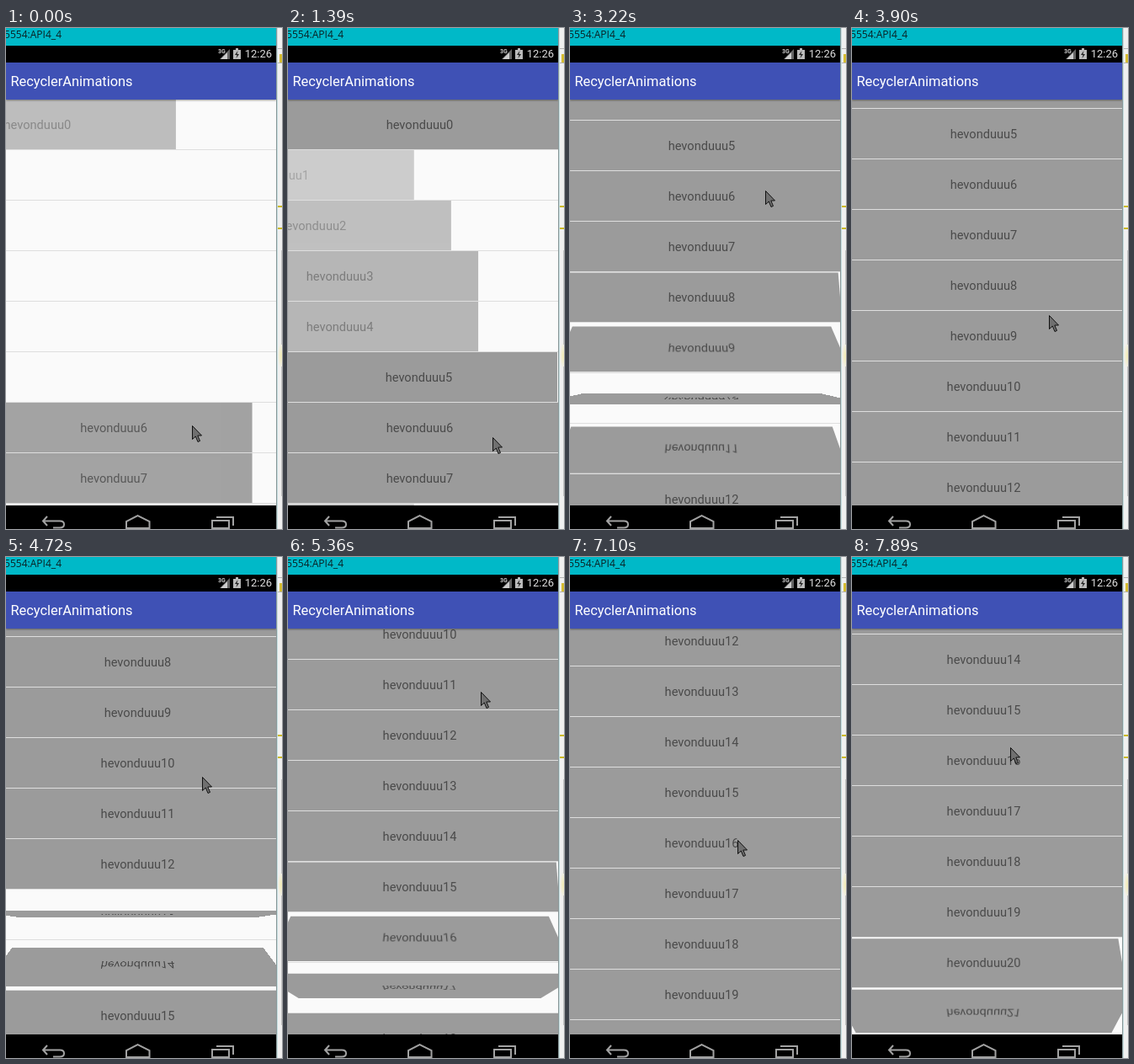
Write an HTML page that moves like this. It is 328 by 595 pixels and loops after 8 s.

```html
<!DOCTYPE html>
<html lang="en">
<head>
<meta charset="utf-8">
<title>RecyclerAnimations</title>
<style>
html, body { margin: 0; width: 328px; height: 595px; overflow: hidden; background: #f0f0f0; }
body { position: relative; font-family: Roboto, sans-serif; }
body > * { position: absolute; }
#caption { left: 0; top: 0; width: 321px; height: 21px; background: #00b9c8; overflow: hidden; }
#caption span { position: absolute; right: 255px; top: 0; font: 12px/16px "Open Sans", sans-serif; white-space: nowrap; color: #0a2023; }
#status { left: 0; top: 21px; width: 321px; height: 20px; background: #000; }
#status span { position: absolute; right: 5px; top: 0; font-size: 13px; line-height: 20px; color: #ddd; }
#bar { left: 0; top: 41px; width: 321px; height: 44px; background: #3f51b5; box-shadow: 0 1px 2px rgba(0,0,0,.4); }
#bar span { position: absolute; left: 5.5px; top: 0; font-size: 16.4px; line-height: 46px; color: #fff; }
#list { left: 0; top: 85px; width: 321px; height: 482px; overflow: hidden; background: #fafafa; }
.row { position: absolute; left: -8px; top: 0; width: 329px; height: 60px; }
.row::after { content: ""; position: absolute; left: 0; top: 59px; width: 100%; height: 1px; background: #dedede; }
.card { height: 59px; background: #9b9b9b; color: #4a4a4a; font-size: 14.6px; line-height: 60px; text-align: center; }
#nav { left: 0; top: 567px; width: 321px; height: 28px; background: #000; }
#side, #icons, #cursor { left: 0; top: 0; }
</style>
</head>
<body>
<div id="list"></div>
<div id="caption"><span>-5554:API4_4</span></div>
<div id="status"><span>12:26</span></div>
<div id="bar"><span>RecyclerAnimations</span></div>
<div id="nav"></div>
<svg id="side" width="328" height="595">
  <defs>
    <radialGradient id="glow"><stop offset="0" stop-color="#f3ecb4"/><stop offset="1" stop-color="#f0f0f0"/></radialGradient>
  </defs>
  <path d="M321 0h1v595h-1z" fill="#8a9798"/>
  <path d="M322 0h1v595h-1z" fill="#c4dcde"/>
  <path d="M323 24h5v1h-5zM323 41h5v1h-5z" fill="#b4b4b4"/>
  <path d="M325 31h3v10h-3z" fill="#d6bd32"/>
  <ellipse cx="327" cy="389" rx="4" ry="16" fill="url(#glow)"/>
  <path d="M323 211h5v2h-5zM323 237h5v2h-5z" fill="#cbb91e"/>
  <path d="M327 264h1v112h-1zM327 402h1v154h-1z" fill="#c6c6c6"/>
</svg>
<svg id="icons" width="328" height="595" fill="none">
  <text x="252" y="30" font-size="7" font-weight="700" fill="#ccc">3G</text>
  <path d="M254 37L266 25V37z" fill="#666"/>
  <path d="M255 37L263 29V37z" fill="#ccc"/>
  <path d="M270 26h3v-2h3v2h3v11h-9z" fill="#bbb"/>
  <path d="M275.500 27l-3.500 5h2.500l-1 4 3.500-5h-2.500z" fill="#222"/>
  <g stroke="#a2a2a2" stroke-width="2">
    <path d="M49 580l-5 5.500 5 5.500M45 585.500h19q5 0 5 4t-5 4h-8"/>
    <path d="M143 594v-8l13.500-7 14 7v8z"/>
    <path d="M245 585h20v9h-20zM250 581h20v10"/>
  </g>
</svg>
<svg id="cursor" width="14" height="22">
  <path d="M.5 .5V16.500L4.300 13 7 19.500 9.500 18.400 6.800 12H11.500z" fill="#707070" stroke="#111"/>
</svg>
<script>
const LOOP = 8000, SLIDE = 1000, FLIP = 690, ROW = 60, WIDTH = 329, REST = 7760;

// each swipe: start, slowing time, distance
const swipes = [
  [2538, 231, 290.5], [4169, 318, 217.5], [4720, 120, 121], [5908, 245, 107], [7110, 75, 97]
];

// pointer: time, x, y
const path = [
  [0, 221, 472], [1390, 243, 486], [2500, 238, 470], [3220, 232, 193], [4150, 235, 446],
  [4720, 233, 261], [5000, 229, 160], [5360, 229, 160], [5880, 205, 447], [6440, 203, 346],
  [7110, 199, 335], [7880, 188, 226]
];

// slide-in starts of the rows on the first screen
const slides = [-589, 903, 817, 751, 751, 425, -810, -810, 903];

// the screen refreshes at an even pace of about 140 ms between these times
const anchors = [0, 1390, 3220, 4720, 5360, 6440, REST, LOOP];

const list = document.getElementById('list');
const cursor = document.getElementById('cursor');

function scrollAt(t) {
  return swipes.reduce((sum, [start, slow, far]) =>
    sum + far * (1 - Math.exp(-Math.max(0, t - start) / slow)), 0);
}

// a row flips once most of it has come into view
function flipStart(i) {
  const need = i * ROW - 430;
  if (need <= 0) return Infinity;
  let t = 0;
  while (t < LOOP && scrollAt(t) < need) t++;
  return t;
}

const rows = Array.from({ length: 23 }, (_, i) => {
  const row = document.createElement('div');
  const card = document.createElement('div');
  row.className = 'row';
  card.className = 'card';
  card.textContent = 'hevonduuu' + i;
  row.append(card);
  list.append(row);
  return { row, card, slide: slides[i] ?? -SLIDE, flip: flipStart(i) };
});

// slow at both ends, 0 to 1
function ease(t, start, length) {
  const x = Math.min(1, Math.max(0, (t - start) / length));
  return (1 - Math.cos(Math.PI * x)) / 2;
}

function pointerAt(t) {
  const k = path.findIndex(p => p[0] > t);
  if (k < 0) return path[path.length - 1];
  const a = path[k - 1], b = path[k];
  const f = (t - a[0]) / (b[0] - a[0]);
  return a.map((v, i) => v + (b[i] - v) * f);
}

function refresh(t) {
  const k = anchors.findIndex(a => a > t);
  const from = anchors[k - 1], gap = anchors[k] - from;
  const step = gap / Math.round(gap / 140);
  return from + Math.floor((t - from) / step) * step;
}

function draw(t) {
  const now = Math.min(t, REST);
  const scroll = scrollAt(now);
  rows.forEach(({ row, card, slide, flip }, i) => {
    const top = Math.round(i * ROW - scroll);
    const shown = ease(now, slide, SLIDE);
    const turn = ease(now, flip, FLIP);
    row.style.display = top > -ROW && top < 482 ? '' : 'none';
    row.style.transform = `translateY(${top}px)`;
    card.style.opacity = shown;
    if (shown < 1) card.style.transform = `translateX(${(shown - 1) * WIDTH}px)`;
    else if (turn > 0 && turn < 1) card.style.transform = `perspective(180px) rotateX(${-360 * turn}deg)`;
    else card.style.transform = '';
  });
  const [, x, y] = pointerAt(t);
  cursor.style.transform = `translate(${Math.round(x)}px, ${Math.round(y)}px)`;
}

const origin = performance.now();
function tick() {
  draw(refresh((performance.now() - origin) % LOOP));
  requestAnimationFrame(tick);
}
tick();
</script>
</body>
</html>
```
